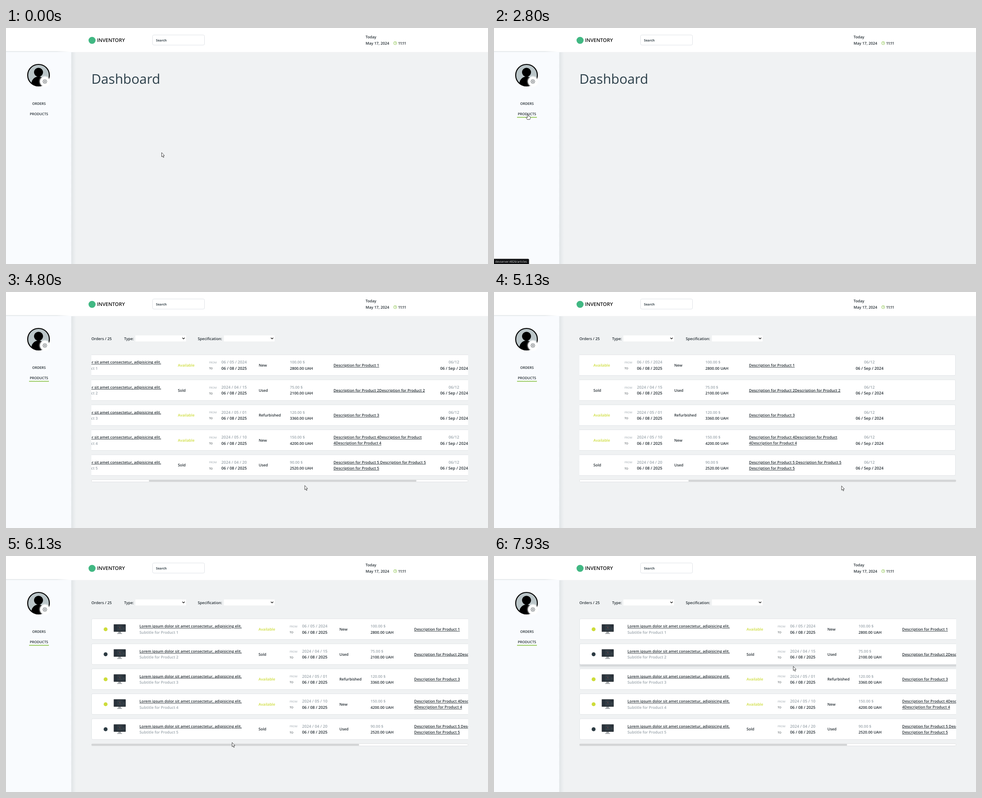
Recreate the animation shown at these times as an HTML page. Size 1067 px wide and 525 px high, loop 8 s.

```html
<!DOCTYPE html>
<html lang="en">
<head>
<meta charset="utf-8">
<title>Inventory dashboard</title>
<style>
  html, body { margin: 0; width: 100%; height: 100%; overflow: hidden; background: #fff; }
  svg { display: block; width: 1067px; height: 525px; }
  text {
    font: 600 8.4px "Open Sans", "Noto Sans", sans-serif;
    fill: #222b31; text-rendering: geometricPrecision; white-space: pre;
  }
  .brand { font-size: 11px; fill: #111; }
  .search { font-size: 7.1px; font-weight: 700; fill: #3d4a51; }
  .clock { letter-spacing: -.1em; }
  .nav { font-size: 7.7px; text-anchor: middle; }
  .heading { font-size: 29.6px; font-weight: 400; fill: #2b3f49; }
  .link { text-decoration: underline; text-decoration-thickness: .7px; text-underline-offset: 1px; }
  .muted { fill: #9ba5ac; }
  .lime { fill: #cddc39; }
  .tiny { font-size: 6px; font-weight: 500; }
  .date { font-size: 8.8px; text-anchor: middle; }
  .status { font-size: 6.5px; font-weight: 400; fill: #d2d2d2; }
</style>
</head>
<body>
<svg viewBox="0 0 1067 525" xmlns="http://www.w3.org/2000/svg">
  <defs>
    <linearGradient id="sideShade">
      <stop offset="0" stop-color="#dfe3e5"/>
      <stop offset=".5" stop-color="#e8ebed"/>
      <stop offset="1" stop-color="#f0f2f3"/>
    </linearGradient>
    <linearGradient id="topShade">
      <stop offset=".8" stop-color="#e3e7e9"/>
      <stop offset="1" stop-color="#e3e7e9" stop-opacity="0"/>
    </linearGradient>
    <filter id="soft" x="-50%" y="-50%" width="200%" height="200%"><feGaussianBlur stdDeviation="1.8"/></filter>
    <filter id="lift" x="-5%" y="-50%" width="110%" height="200%"><feGaussianBlur stdDeviation="2.6"/></filter>
    <clipPath id="avatarClip"><circle cx="72" cy="105" r="24"/></clipPath>
    <clipPath id="listClip"><rect x="189" y="130" width="834" height="284"/></clipPath>
    <g id="monitor">
      <path d="M249 168h5l1 4h-7z" fill="#a9adb0"/>
      <rect x="246" y="172" width="11" height="1.2" fill="#8c9195"/>
      <rect x="238.500" y="152" width="26.500" height="16.500" rx=".6" fill="#22282d"/>
      <rect x="239.500" y="153" width="24.500" height="14" fill="#303a42"/>
      <path d="M239.500 153h6v14h-6zM258 153h6v5h-6z" fill="#28313a"/>
      <path d="M248 156h6M248 163h8M259 161h4" stroke="#46525a" stroke-width=".8"/>
      <path d="M251 158.500l2 2" stroke="#8f4a50" stroke-width="1.200"/>
    </g>
    <g id="chevron"><path d="M-2.600 -1.200L0 1.400L2.600 -1.200" fill="none" stroke="#111" stroke-width="1.300"/></g>
  </defs>

  <rect width="1067" height="525" fill="#fff"/>
  <rect x="145" y="53.500" width="922" height="472" fill="#f0f2f3"/>
  <rect x="144" y="54" width="11" height="471" fill="url(#sideShade)"/>
  <rect y="53" width="144.500" height="472" fill="#f9fbfe"/>
  <rect y="51.500" width="140" height="1.800" fill="url(#topShade)"/>

  <circle cx="190.500" cy="27.500" r="7.800" fill="#41b883"/>
  <text class="brand" x="201.500" y="31">INVENTORY</text>
  <rect x="324.500" y="15.500" width="115" height="22.500" rx="3" fill="#fff" stroke="#dfe3e7"/>
  <text class="search" x="332" y="30">Search</text>
  <text x="796" y="23.300">Today</text>
  <text x="796" y="36.800">May 17, 2024</text>
  <g fill="none" stroke="#8bc34a" stroke-width=".9"><circle cx="861.500" cy="33.600" r="3.400"/><path d="M861.500 31.500v2.300h1.800"/></g>
  <text class="clock" x="868" y="36.800">11:11</text>

  <circle cx="72" cy="105" r="24" fill="#bac5c8"/>
  <g clip-path="url(#avatarClip)"><circle cx="72" cy="98.500" r="10"/><ellipse cx="72" cy="125" rx="16" ry="17"/></g>
  <circle cx="72" cy="105" r="24" fill="none" stroke="#000" stroke-width="2.200"/>
  <circle cx="86" cy="119" r="11.500" fill="#fff" filter="url(#soft)"/>
  <circle cx="86" cy="119" r="10.500" fill="#fff"/>
  <g id="gear" transform="translate(86 119)" fill="none" stroke="#3b4247" stroke-width=".8"></g>

  <text class="nav" x="73" y="171">ORDERS</text>
  <text class="nav" x="73" y="194.200">PRODUCTS</text>
  <rect id="ordersLine" y="174.800" height="1.700" fill="#8bc34a"/>
  <rect id="productsLine" y="197.800" height="1.700" fill="#8bc34a"/>

  <text id="dashboard" class="heading" x="189" y="124">Dashboard</text>

  <g id="products">
    <text x="189" y="106.500">Orders / 25</text>
    <text x="261.500" y="106.500">Type:</text>
    <text x="424.500" y="106.500">Specification:</text>
    <rect x="286.500" y="96.500" width="112" height="13.500" fill="#fff"/>
    <rect x="482.500" y="96.500" width="112" height="13.500" fill="#fff"/>
    <use href="#chevron" x="393" y="103"/>
    <use href="#chevron" x="589" y="103"/>
    <g clip-path="url(#listClip)"><g id="rows"></g></g>
    <rect x="189.500" y="417.500" width="833" height="5" rx="1" fill="#fff" stroke="#e0e2e3"/>
    <rect id="thumb" x="189.500" y="418.300" width="592" height="3.400" rx="1" fill="#cfd1d2"/>
  </g>

  <g id="status">
    <path d="M0 513.500h75.500q2 0 2 2V525H0z" fill="#101113"/>
    <text class="status" x="2.800" y="521.700">devserver:4826/articles</text>
  </g>

  <g id="cursor" stroke-linejoin="round">
    <path id="arrow" d="M.5 .4V9.900L2.600 8L4.100 11.500L5.600 10.900L4.100 7.400H6.900Z" fill="#fff" stroke="#222" stroke-width=".8"/>
    <path id="hand" d="M-1 1Q0-.4 1 1V5Q2.200 4.200 3 5.400Q4.300 5 4.600 6.200Q5.500 6.200 5.500 7.400V9.500L4.400 12.600H-1.400L-4 8.300Q-4 6.600-2.500 7.400L-1 8.600Z" fill="#fff" stroke="#222" stroke-width=".8"/>
  </g>
</svg>
<script>
const LOOP = 8000;
const ROW_TOP = 139.7, ROW_PITCH = 55.6, ROW_HEIGHT = 46;
const MAX_SCROLL = 339, MAX_THUMB = 241;
const $ = id => document.getElementById(id);

// [time, x, y]
const CURSOR = [
  [0, 344, 276.6], [330, 344, 277], [400, 346, 277], [670, 344, 277.5],
  [1270, 55, 150], [1470, 80, 118], [1530, 80, 118], [1900, 73, 172], [2050, 73, 173],
  [2330, 88, 114.5], [2400, 88, 115], [2680, 75, 191], [3200, 75, 191],
  [4070, 523, 417], [4230, 523, 417], [4270, 523, 418.5], [4500, 523, 418.5],
  [4800, 660.5, 430], [5250, 782, 431], [5470, 780, 431], [5670, 667, 430.5],
  [5950, 503, 424], [6130, 500, 414.5], [6350, 514, 353], [7130, 539, 168], [7300, 539, 168],
  [7530, 546, 226], [7640, 546, 226], [7930, 662, 245]
];
const SCROLL = [[4530, 0], [4800, 178], [5130, MAX_SCROLL], [5530, MAX_SCROLL], [5670, 237.5], [5980, 0]];

const ROWS = [
  ["Available", "06 / 05 / 2024", "New", "100.00 $", "2800.00 UAH", ["Description for Product 1"]],
  ["Sold", "2024 / 04 / 15", "Used", "75.00 $", "2100.00 UAH", ["Description for Product 2Description for Product 2"]],
  ["Available", "2024 / 05 / 01", "Refurbished", "120.00 $", "3360.00 UAH", ["Description for Product 3"]],
  ["Available", "2024 / 05 / 10", "New", "150.00 $", "4200.00 UAH",
    ["Description for Product 4Description for Product", "4Description for Product 4"]],
  ["Sold", "2024 / 04 / 20", "Used", "90.00 $", "2520.00 UAH",
    ["Description for Product 5 Description for Product 5", "Description for Product 5"]]
];

const label = (x, y, content, cls = "") => `<text class="${cls}" x="${x}" y="${y}">${content}</text>`;

function rowMarkup([state, from, condition, dollars, local, description], i) {
  const available = state === "Available";
  const top = 159.4, mid = 166, low = 172.8;
  const lines = description.length > 1 ? [top, low - .2] : [mid];
  return `<g transform="translate(0 ${i * ROW_PITCH})">
    <rect class="shade" x="189" y="${ROW_TOP + 4}" width="1172" height="${ROW_HEIGHT}" fill="#1c2830" filter="url(#lift)"/>
    <rect x="189.5" y="${ROW_TOP}" width="1171" height="${ROW_HEIGHT}" rx="2.5" fill="#fff" stroke="#dfe3e6" stroke-width=".9"/>
    <circle cx="220.5" cy="163" r="4.3" fill="${available ? "#cddc39" : "#2b3a42"}"/>
    <use href="#monitor"/>
    ${label(295.5, top, "Lorem ipsum dolor sit amet consectetur, adipisicing elit.", "link")}
    ${label(295.5, low, `Subtitle for Product ${i + 1}`, "muted")}
    ${label(559, mid, state, available ? "lime" : "")}
    ${label(628, 159, "FROM", "tiny muted")}
    ${label(628, 172.2, "TO", "tiny")}
    ${label(683.5, top, from, "date muted")}
    ${label(683.5, low, "06 / 08 / 2025", "date")}
    ${label(738, mid, condition)}
    ${label(807, top, dollars, "muted")}
    ${label(807, low, local)}
    ${description.map((line, n) => label(903.5, lines[n], line, "link")).join("")}
    ${label(1170, top, "06/12", "date muted")}
    ${label(1170.5, low, "06 / Sep / 2024", "date")}
  </g>`;
}

function gearMarkup() {
  const points = Array.from({ length: 32 }, (_, i) => {
    const angle = (i - .5) * Math.PI / 16;
    const radius = i % 4 < 2 ? 4.6 : 3.6;
    return `${(radius * Math.cos(angle)).toFixed(2)},${(radius * Math.sin(angle)).toFixed(2)}`;
  });
  return `<polygon points="${points.join(" ")}"/><circle r="1.7"/>`;
}

const clamp = (v, lo = 0, hi = 1) => Math.min(hi, Math.max(lo, v));
const ramp = (t, start, end) => clamp((t - start) / (end - start));

// Monotone cubic interpolation: smooth through keys, never overshooting.
function track(keys, t, column = 1) {
  const last = keys.length - 1;
  if (t <= keys[0][0]) return keys[0][column];
  if (t >= keys[last][0]) return keys[last][column];
  const i = keys.findIndex(key => key[0] > t) - 1;
  const slope = k => k < 0 || k >= last ? 0
    : (keys[k + 1][column] - keys[k][column]) / (keys[k + 1][0] - keys[k][0]);
  const tangent = k => {
    const a = slope(k - 1), b = slope(k);
    return a * b > 0 ? 2 * a * b / (a + b) : 0;
  };
  const span = keys[i + 1][0] - keys[i][0];
  const u = (t - keys[i][0]) / span, v = 1 - u;
  return keys[i][column] * (1 + 2 * u) * v * v + keys[i + 1][column] * u * u * (3 - 2 * u)
    + span * (tangent(i) * u * v * v - tangent(i + 1) * u * u * v);
}

const pointer = t => ({ x: track(CURSOR, t, 1), y: track(CURSOR, t, 2) });
const overOrders = p => p.x > 55 && p.x < 91 && p.y > 161 && p.y < 178;
const overProducts = p => p.x > 50 && p.x < 96 && p.y > 184 && p.y < 201;
const overRow = (p, i) => p.x > 189 && p.x < 1023
  && p.y > ROW_TOP + i * ROW_PITCH && p.y < ROW_TOP + i * ROW_PITCH + ROW_HEIGHT;

// Share of the recent past in which the test held: a linear hover transition.
function hoverAmount(t, duration, test) {
  const samples = 12;
  let hits = 0;
  for (let k = 0; k < samples; k++) hits += test(pointer(t - duration * k / samples));
  return hits / samples;
}

function setLine(line, width, amount) {
  line.setAttribute("x", 73 - width * amount / 2);
  line.setAttribute("width", width * amount);
}

$("gear").innerHTML = gearMarkup();
$("rows").innerHTML = ROWS.map(rowMarkup).join("");
const shades = [...document.querySelectorAll(".shade")];

function render(t) {
  const p = pointer(t), scroll = track(SCROLL, t);
  const onProducts = t >= 3000;
  const hand = overOrders(p) || overProducts(p);

  $("cursor").setAttribute("transform", `translate(${p.x} ${p.y})`);
  $("arrow").setAttribute("visibility", hand ? "hidden" : "visible");
  $("hand").setAttribute("visibility", hand ? "visible" : "hidden");

  setLine($("ordersLine"), 34, hoverAmount(t, 150, overOrders));
  setLine($("productsLine"), 44, onProducts ? 1 : hoverAmount(t, 150, overProducts));

  $("dashboard").setAttribute("visibility", onProducts ? "hidden" : "visible");
  $("products").setAttribute("opacity", ramp(t, 2990, 3100));
  $("status").setAttribute("opacity", ramp(t, 2660, 2780) * (1 - ramp(t, 3060, 3330)));

  $("rows").setAttribute("transform", `translate(${-scroll} 0)`);
  $("thumb").setAttribute("x", 189.5 + scroll * MAX_THUMB / MAX_SCROLL);
  shades.forEach((shade, i) =>
    shade.setAttribute("opacity", onProducts ? .26 * hoverAmount(t, 300, q => overRow(q, i)) : 0));
}

const start = performance.now();
function tick() {
  render((performance.now() - start) % LOOP);
  requestAnimationFrame(tick);
}
tick();
</script>
</body>
</html>
```
